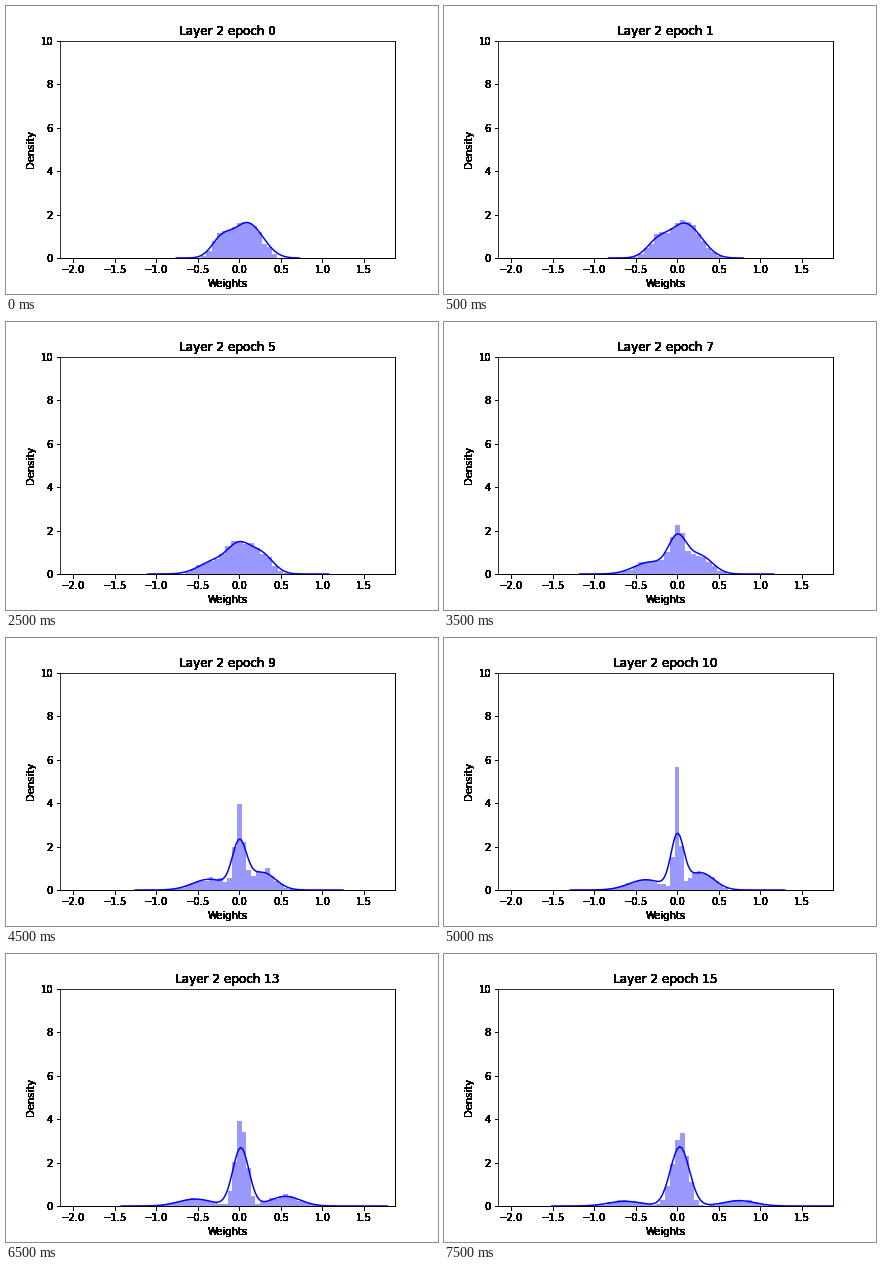
Animation of 432 by 288 pixels, one loop 8000 ms. Source, as a matplotlib script:

```python
import numpy as np
import matplotlib.pyplot as plt
from matplotlib.animation import FuncAnimation

EPOCHS = 16
STAGES = [0, 5, 10, 15]
BANDWIDTH = .07
BIN_START = -.03
COPIES = 14

# Three groups of weights, each given by its value at the four stages
GROUPS = [
    dict(share=[.28, .27, .24, .11], mean=[-.21, -.30, -.38, -.63],
         spread=[.10, .17, .19, .19]),
    dict(share=[.39, .42, .46, .78], mean=[.05, .00, .00, .03],
         spread=[.12, .12, .034, .09]),
    dict(share=[.28, .30, .32, .12], mean=[.22, .27, .28, .74],
         spread=[.13, .12, .145, .18]),
]
BIN_WIDTH = [.061, .070, .053, .058]
LOW = [-.76, -1.10, -1.29, -1.51]
HIGH = [.72, 1.07, 1.29, 2.10]


def at(epoch, values):
    return np.interp(epoch, STAGES, values)


def density(x, epoch, blur=0):
    total = np.zeros_like(x)
    for group in GROUPS:
        share, mean, spread = (at(epoch, v) for v in group.values())
        s = np.hypot(spread, blur)
        total += share / (s * np.sqrt(2 * np.pi)) \
            * np.exp(-.5 * ((x - mean) / s) ** 2)
    return total


def histogram(epoch):
    width = at(epoch, BIN_WIDTH)
    first = np.ceil((at(epoch, LOW) + .25 - BIN_START) / width)
    last = np.floor((at(epoch, HIGH) - .25 - BIN_START) / width)
    edges = BIN_START + width * np.arange(first, last + 1)
    heights = density(edges[:-1] + width / 2, epoch)
    rng = np.random.default_rng(epoch)
    heights += .08 * np.sqrt(heights) * rng.standard_normal(heights.size)
    return heights.clip(0), edges


fig = plt.figure(figsize=(6, 4), dpi=72, facecolor="white")


def add_axes(**kw):
    ax = fig.add_axes([.125, .125, .775, .755], **kw)
    ax.set(xlabel="Weights", ylabel="Density")
    return ax


base = add_axes()
bars = base.stairs([0], [0, 1], fill=True, color="blue", alpha=.4)
curve, = base.plot([], [], color="blue", lw=1.5)

# Stacked copies harden the edges of everything outside the white panel
layers = [base] + [add_axes(facecolor="none") for _ in range(COPIES)]
for ax in layers:
    ax.set(xlim=(-2.158, 1.87), ylim=(0, 10),
           xticks=np.arange(-2, 1.6, .5), yticks=range(0, 11, 2))
for ax in layers[1:]:
    ax.spines[["top", "left"]].set_visible(False)


def draw(epoch):
    x = np.linspace(at(epoch, LOW), at(epoch, HIGH), 128)
    curve.set_data(x, density(x, epoch, BANDWIDTH))
    bars.set_data(*histogram(epoch))
    for ax in layers:
        ax.set_title(f"Layer 2 epoch {epoch}")
    return [bars, curve]


anim = FuncAnimation(fig, draw, frames=EPOCHS, interval=500,
                     repeat=True, repeat_delay=0, blit=False)
plt.show()
```
